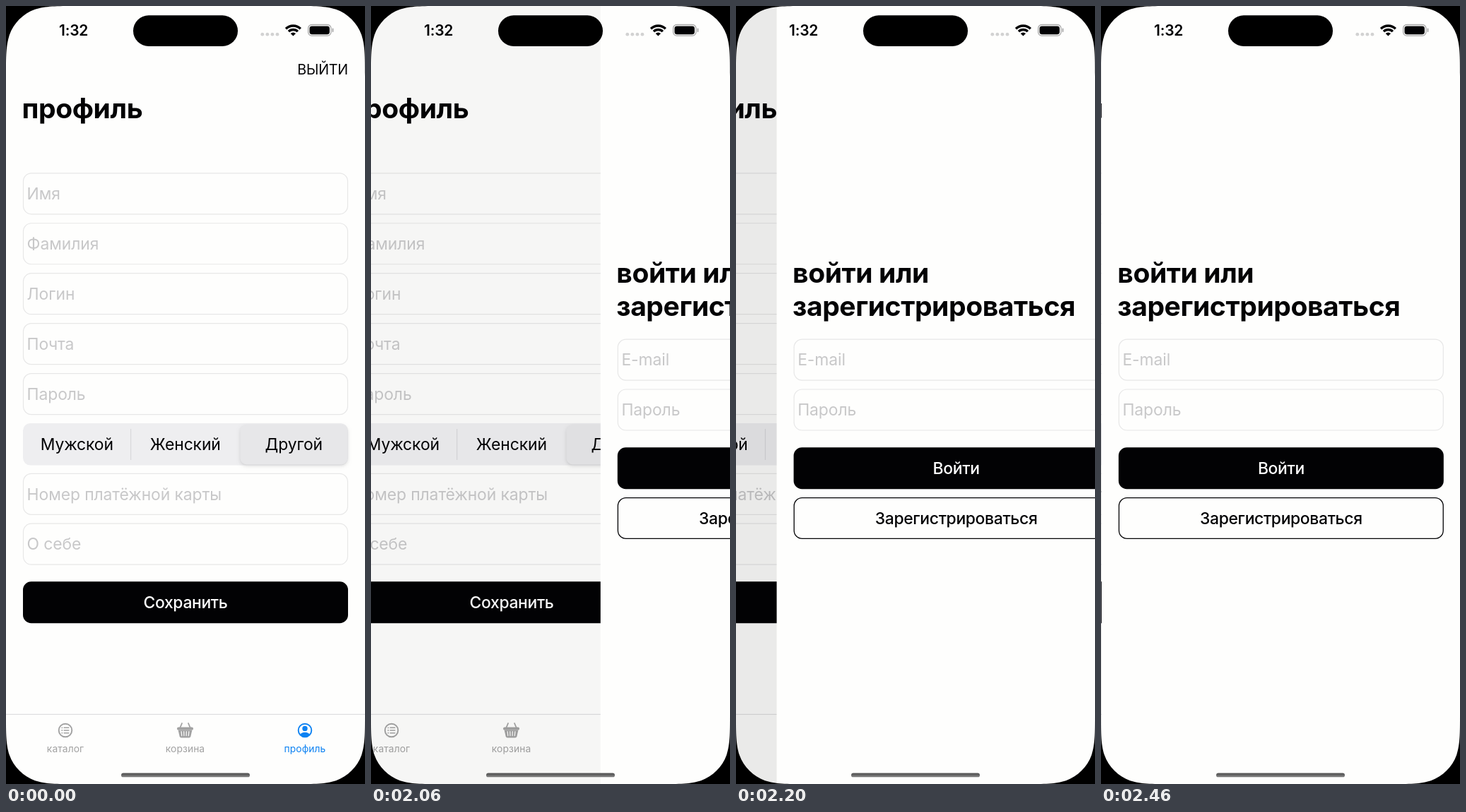
Animation of 508 by 1102 pixels, one loop 2.5 s. Source, as an HTML page with a canvas:

```html
<!DOCTYPE html>
<html lang="ru">
<head>
<meta charset="utf-8">
<title>Профиль</title>
<style>
html, body { margin: 0; width: 100%; height: 100%; overflow: hidden; background: #000; }
canvas { display: block; width: 508px; height: 1102px; }
</style>
</head>
<body>
<canvas id="stage" width="508" height="1102"></canvas>
<script>
const W = 508, H = 1102, LOOP = 2500;
const PAPER = '#fefefd', INK = '#020204', HINT = '#c8c8c9', EDGE = '#e7e7e7';
const GRAY = '#a2a2a2', BLUE = '#0d82f2';
const ctx = document.getElementById('stage').getContext('2d');

function text(str, x, y, size, { weight = 400, color = INK, align = 'left', gap = 0 } = {}) {
  ctx.font = `${weight} ${size}px Inter, "Open Sans", sans-serif`;
  ctx.letterSpacing = gap + 'px';
  ctx.textAlign = align;
  ctx.fillStyle = color;
  ctx.fillText(str, x, y);
}

function box(x, y, w, h, r, fill, stroke, line = 1.2) {
  ctx.beginPath();
  ctx.roundRect(x, y, w, h, r);
  if (fill) { ctx.fillStyle = fill; ctx.fill(); }
  if (stroke) { ctx.strokeStyle = stroke; ctx.lineWidth = line; ctx.stroke(); }
}

function disc(x, y, r, color) {
  ctx.beginPath();
  ctx.arc(x, y, r, 0, Math.PI * 2);
  ctx.fillStyle = color;
  ctx.fill();
}

function ring(x, y, r, width, color) {
  ctx.beginPath();
  ctx.arc(x, y, r, 0, Math.PI * 2);
  ctx.strokeStyle = color;
  ctx.lineWidth = width;
  ctx.stroke();
}

function lines(points, width, color) {
  ctx.beginPath();
  for (const [x1, y1, x2, y2] of points) { ctx.moveTo(x1, y1); ctx.lineTo(x2, y2); }
  ctx.strokeStyle = color;
  ctx.lineWidth = width;
  ctx.lineCap = 'round';
  ctx.stroke();
}

function field(label, y) {
  box(24.5, y + 0.4, 459, 58, 11.5, null, EDGE);
  text(label, 29.6, y + 37.6, 22.9, { color: HINT, gap: -0.1 });
}

function button(label, y, solid) {
  if (solid) box(24, y, 460, 59, 11.8, INK);
  else box(24.6, y + 0.6, 458.8, 57.8, 11.4, PAPER, INK, 1.3);
  text(label, 254, y + 37.7, 22.9, { weight: 500, color: solid ? '#fff' : INK, align: 'center', gap: -0.35 });
}

function segments() {
  box(24, 591, 460, 59.5, 10.5, '#eeeef0');
  ctx.save();
  ctx.shadowColor = 'rgba(0,0,0,.13)';
  ctx.shadowBlur = 5;
  ctx.shadowOffsetY = 2;
  box(331.5, 593, 152, 56.5, 9, '#e7e7e9');
  ctx.restore();
  ctx.fillStyle = '#d8d8db';
  ctx.fillRect(176, 599, 1.2, 44);
  ['Мужской', 'Женский', 'Другой'].forEach((s, i) =>
    text(s, 100.3 + i * 153.5, 629, 22.9, { align: 'center', gap: -0.1 }));
}

function listIcon(x, y) {
  ring(x, y, 9.3, 1.9, GRAY);
  for (const d of [-3.7, 0, 3.7]) {
    disc(x - 4.7, y + d, 0.9, GRAY);
    lines([[x - 1.9, y + d, x + 4.8, y + d]], 1.4, GRAY);
  }
}

function basketIcon(x, y) {
  lines([[x - 7.5, y - 3, x - 4.5, y - 10], [x + 7.5, y - 3, x + 4.5, y - 10]], 1.8, GRAY);
  box(x - 11.5, y - 4.5, 23, 4.2, 2, GRAY);
  ctx.beginPath();
  ctx.moveTo(x - 9.8, y);
  ctx.lineTo(x + 9.8, y);
  ctx.lineTo(x + 7.9, y + 8.4);
  ctx.quadraticCurveTo(x + 7.4, y + 10.5, x + 5.5, y + 10.5);
  ctx.lineTo(x - 5.5, y + 10.5);
  ctx.quadraticCurveTo(x - 7.4, y + 10.5, x - 7.9, y + 8.4);
  ctx.fill();
  lines([-5.4, -1.8, 1.8, 5.4].map(d => [x + d, y + 1.6, x + d * 0.88, y + 7.6]), 1.2, PAPER);
}

function personIcon(x, y) {
  ring(x, y, 9.3, 1.9, BLUE);
  disc(x, y - 2.6, 3.7, BLUE);
  ctx.save();
  ctx.beginPath();
  ctx.arc(x, y, 9, 0, Math.PI * 2);
  ctx.clip();
  ctx.beginPath();
  ctx.ellipse(x, y + 7.8, 7.2, 5.1, 0, 0, Math.PI * 2);
  ctx.fill();
  ctx.restore();
}

function profile(pressed) {
  ctx.fillStyle = PAPER;
  ctx.fillRect(0, 0, W, H);
  text('ВЫЙТИ', 484, 97, 19.7, { align: 'right', color: pressed ? '#d3d3d3' : INK, gap: -0.2 });
  text('профиль', 22.5, 158.5, 39, { weight: 700, gap: -0.4 });
  ['Имя', 'Фамилия', 'Логин', 'Почта', 'Пароль'].forEach((s, i) => field(s, 236.4 + i * 70.95));
  segments();
  field('Номер платёжной карты', 662);
  field('О себе', 732.8);
  button('Сохранить', 815.3, true);
  ctx.fillStyle = '#dededf';
  ctx.fillRect(0, 1002.8, W, 1.2);
  listIcon(84, 1026);
  basketIcon(253.5, 1026);
  personIcon(423, 1026);
  ['каталог', 'корзина', 'профиль'].forEach((s, i) =>
    text(s, 84 + i * 169.5, 1057, 13.8, { align: 'center', color: i === 2 ? BLUE : GRAY, gap: 0.1 }));
}

function login() {
  ctx.fillStyle = PAPER;
  ctx.fillRect(0, 0, W, H);
  text('войти или', 22.5, 392, 39, { weight: 700, gap: -0.4 });
  text('зарегистрироваться', 22.5, 438.5, 39, { weight: 700, gap: -0.4 });
  field('E-mail', 471.7);
  field('Пароль', 542.6);
  button('Войти', 625.3, true);
  button('Зарегистрироваться', 696, false);
}

function wifi(x, y) {
  const a = -Math.PI * 0.75, b = -Math.PI * 0.25;
  ctx.fillStyle = INK;
  for (const [outer, inner] of [[16.4, 12.9], [10.9, 7.4], [5.2, 0]]) {
    ctx.beginPath();
    ctx.arc(x, y, outer, a, b);
    ctx.arc(x, y, inner, b, a, true);
    ctx.fill();
  }
}

function statusBar() {
  text('1:32', 95.6, 42.3, 21, { weight: 600, align: 'center', gap: -0.2 });
  box(180, 13.3, 148, 43.7, 21.8, '#000');
  for (let i = 0; i < 4; i++) disc(362.8 + i * 7.05, 40.2, 2.4, '#d2d2d2');
  wifi(406.4, 42.6);
  box(427.6, 26.5, 32.3, 15.6, 5, null, '#a8a8a8', 1.3);
  box(429.5, 28.4, 28.4, 11.8, 3.4, INK);
  box(461.6, 31.6, 1.8, 5.4, 1, '#a8a8a8');
  const g = ctx.createLinearGradient(0, 1086.5, 0, 1092.3);
  g.addColorStop(0, '#4c4c4c');
  g.addColorStop(1, '#868686');
  box(163, 1086.5, 182, 5.8, 2.9, g);
}

// Black outside a smooth-cornered screen
function corners() {
  const r = 65;
  ctx.fillStyle = '#000';
  for (const [sx, sy] of [[1, 1], [-1, 1], [1, -1], [-1, -1]]) {
    ctx.save();
    ctx.translate(sx < 0 ? W : 0, sy < 0 ? H : 0);
    ctx.scale(sx * r, sy * r);
    ctx.beginPath();
    ctx.moveTo(0, 0);
    ctx.lineTo(1.5287, 0);
    ctx.bezierCurveTo(1.0885, 0, 0.8684, 0, 0.6315, 0.0749);
    ctx.bezierCurveTo(0.3728, 0.1691, 0.1691, 0.3728, 0.0749, 0.6315);
    ctx.bezierCurveTo(0, 0.8684, 0, 1.0885, 0, 1.5287);
    ctx.fill();
    ctx.restore();
  }
}

// Share of the push still to go: critically damped spring, 30 steps a second
function remaining(t) {
  if (t < 2000) return 1;
  let k = Math.floor((t - 2000) * 0.03) + 1;
  while (Math.floor(k * 10 / 3) * 10 > t - 2000) k--;
  const s = 18.5 * (Math.min(k, 14) / 30 + 0.0017);
  return (1 + s) * Math.exp(-s);
}

function draw(t) {
  const rest = remaining(t), x = W * rest;
  ctx.save();
  ctx.translate(-0.3 * (W - x), 0);
  profile(t >= 1800);
  ctx.restore();
  if (rest < 1) {
    ctx.fillStyle = `rgba(0,0,0,${0.09 * (1 - rest)})`;
    ctx.fillRect(0, 0, W, H);
    ctx.save();
    ctx.translate(x, 0);
    login();
    ctx.restore();
  }
  statusBar();
  corners();
}

const start = performance.now();
function tick() {
  draw((performance.now() - start) % LOOP);
  requestAnimationFrame(tick);
}
tick();
</script>
</body>
</html>
```
